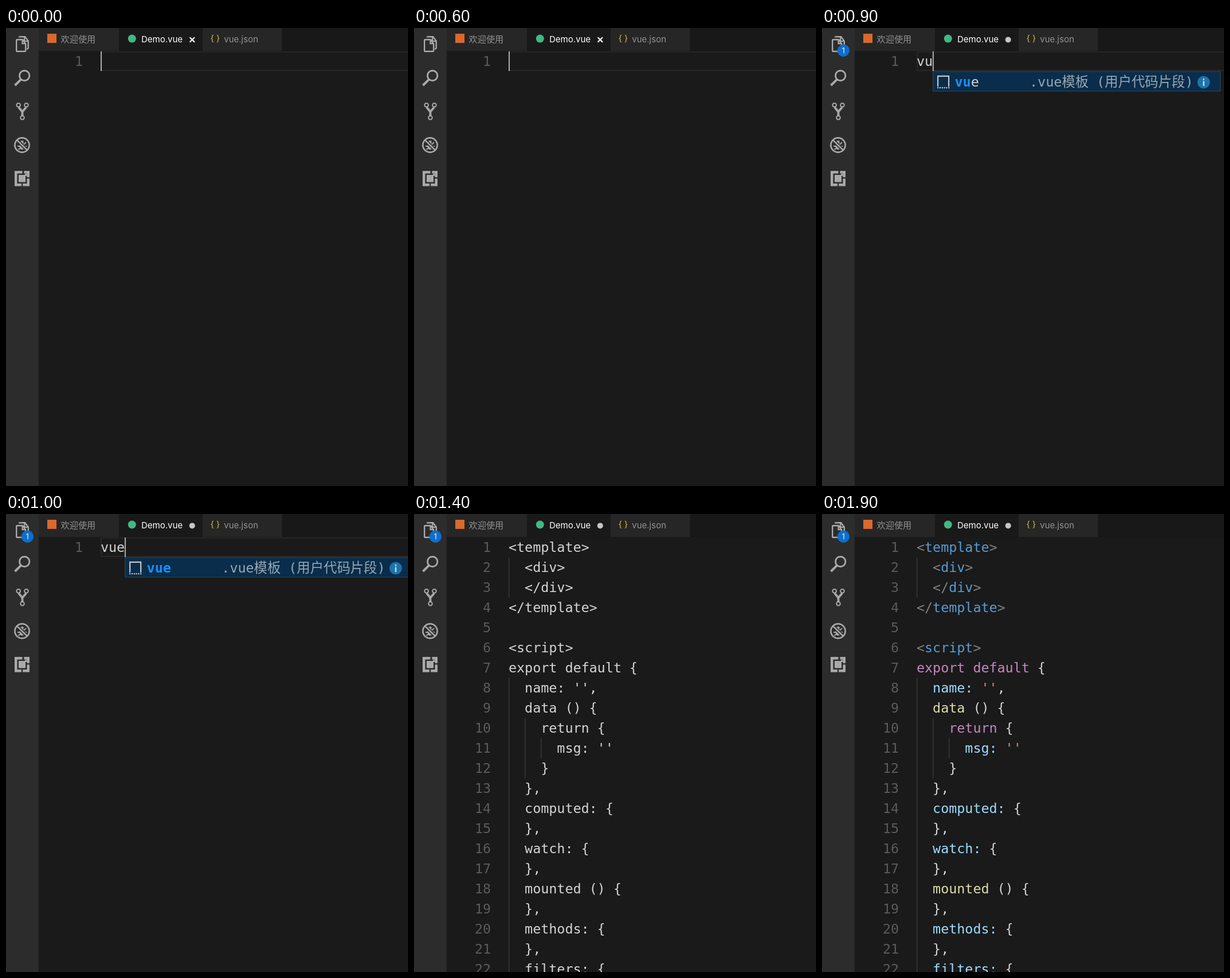
Animation, 701 px wide and 798 px high, one loop 3900 ms. Source, as an HTML page with a canvas:

```html
<!DOCTYPE html>
<html lang="zh-CN">
<head>
<meta charset="utf-8">
<title>Snippet demo</title>
<style>
html, body { margin: 0; width: 100%; height: 100%; overflow: hidden; background: #1a1a1a; }
canvas { display: block; width: 701px; height: 798px; }
</style>
</head>
<body>
<canvas id="stage" width="701" height="798"></canvas>
<script>
const ctx = document.getElementById('stage').getContext('2d', { alpha: false });
const LOOP = 3900, LEFT = 165, LINE = 35;
const CJK = "'Noto Sans CJK SC', 'Noto Sans CJK'";
const MONO = `23.35px 'DejaVu Sans Mono', ${CJK}, monospace`;
const UI = `15px Inter, ${CJK}, sans-serif`;
const BG = '#1a1a1a', SIDE = '#2c2c2c', ICON = '#a9a9a9', TEXT = '#d4d4d4';

const code = `<template>
  <div>
  </div>
</template>

<script>
export default {
  name: '',
  data () {
    return {
      msg: ''
    }
  },
  computed: {
  },
  watch: {
  },
  mounted () {
  },
  methods: {
  },
  filters: {`.split('\n');

// Indent guides: x, first line, last line
const guides = [[165, 2, 3], [165, 8, 22], [193, 10, 12], [221, 11, 11]];

function rect(x, y, w, h, color) {
  ctx.fillStyle = color;
  ctx.fillRect(x, y, w, h);
}

function disc(x, y, r, color) {
  ctx.fillStyle = color;
  ctx.beginPath();
  ctx.arc(x, y, r, 0, Math.PI * 2);
  ctx.fill();
}

function ring(x, y, r, width, color = ICON) {
  ctx.strokeStyle = color;
  ctx.lineWidth = width;
  ctx.beginPath();
  ctx.arc(x, y, r, 0, Math.PI * 2);
  ctx.stroke();
}

function line(path, width, color = ICON) {
  ctx.strokeStyle = color;
  ctx.lineWidth = width;
  ctx.stroke(new Path2D(path));
}

function text(str, x, y, font, color, align = 'left') {
  ctx.font = font;
  ctx.fillStyle = color;
  ctx.textAlign = align;
  ctx.fillText(str, x, y);
}

function charWidth() {
  ctx.font = MONO;
  return ctx.measureText('0').width;
}

function drawFiles() {
  line('M23 16.5 Q23 15.3 24.5 15.3 H33.2 L38.8 22.8 V35 Q38.8 36.2 36 36.4', 2.4);
  line('M32.2 15.5 V23 H38.8', 2.2);
  line('M19.8 20.2 H29 L34.2 27.6 V39.2 Q34.2 40.8 32.6 40.8 H19.8 Q18.2 40.8 18.2 39.2 V21.8 Q18.2 20.2 19.8 20.2 Z', 2.4);
  line('M28.6 20.2 V27.2 H34.2', 2.2);
}

function drawBug() {
  ctx.fillStyle = ICON;
  ctx.beginPath();
  ctx.ellipse(28, 206, 4.6, 6, 0, 0, Math.PI * 2);
  ctx.fill();
  disc(28, 198.5, 2.6, ICON);
  line('M20 206 H36 M21 199 L25 203 M35 199 L31 203 M21.5 212 L25 209 M34.5 212 L31 209', 1.8);
  line('M18 194 L38 214', 6, SIDE);
  line('M18.6 194.6 L37.4 213.4', 2.6);
  ring(28, 204, 12.6, 2.7);
}

function drawSidebar(badge) {
  rect(0, 0, 57, 798, SIDE);
  drawFiles();

  ring(32.2, 83, 8.7, 2.9);
  line('M25.8 89.8 L15.6 100', 4);

  line('M22 138 L28.5 146 L35.2 138 M28.5 145 V153', 3.8);
  for (const [x, y] of [[21.7, 134.3], [35.5, 134.3], [28.5, 156.3]]) ring(x, y, 3.3, 2);

  drawBug();

  rect(15, 249, 26, 26.5, ICON);
  rect(19.5, 253.5, 17, 17.5, SIDE);
  rect(22, 256, 12, 12.5, ICON);
  rect(27, 271, 2.2, 5, SIDE);
  rect(28.5, 248, 3, 6, SIDE);
  rect(36, 260, 6, 2.4, SIDE);
  rect(33, 254, 3.5, 4, ICON);

  if (badge) {
    disc(37.4, 39.3, 10.6, '#0c6fce');
    text('1', 37.4, 43.8, '12.5px Inter, sans-serif', '#fff', 'center');
  }
}

function drawTabs(dirty) {
  rect(57, 0, 644, 40.5, '#181818');
  rect(57, 0, 140, 40, '#262626');
  rect(343, 0, 138, 40, '#262626');
  rect(197, 0, 146, 41, '#191919');

  rect(72, 10, 16, 16, '#d9692d');
  text('欢迎使用', 95.5, 25, `15.2px ${CJK}, sans-serif`, '#929292');

  disc(219.7, 18.5, 7, '#41b883');
  text('Demo.vue', 236, 25, UI, '#fff');
  if (dirty) disc(324.6, 20.4, 5, '#c6c6c6');
  else line('M320.5 16.2 L328.9 24.6 M328.9 16.2 L320.5 24.6', 2.3, '#f0f0f0');

  text('{ }', 364.7, 23, '14.5px Inter, sans-serif', '#d4c12f', 'center');
  text('vue.json', 380, 25, UI, '#929292');
}

function drawNumber(n) {
  text(n, 134, 66 + (n - 1) * LINE, MONO, '#5a5a5a', 'right');
}

function drawSuggest(typed, cw) {
  const x = 179 + (typed - 1) * cw;
  rect(x, 75.5, 502, 35, '#34495a');
  rect(x + 1, 76.5, 500, 33, '#092d4b');

  line(`M${x + 9} 102 V83.8 H${x + 28} V102`, 2.2, '#c8c5c2');
  for (let i = 0; i < 6; i++) rect(x + 8 + i * 3.8, 103, 2.2, 2.2, '#c8c5c2');

  const word = 'vue', tx = x + 38.5;
  text(word.slice(0, typed), tx, 102, 'bold ' + MONO, '#188fff');
  text(word.slice(typed), tx + typed * cw, 102, MONO, TEXT);
  text('.vue模板 (用户代码片段)', x + 169, 102, MONO, '#98a7b2');

  disc(x + 472.4, 94.5, 10.8, '#1b74ad');
  rect(x + 471.2, 88, 2.6, 2.7, '#c3d7e4');
  rect(x + 471.2, 92.5, 2.6, 8.5, '#c3d7e4');
}

function drawInput(typed, cursor) {
  const cw = charWidth();
  ctx.strokeStyle = '#282828';
  ctx.lineWidth = 2;
  ctx.strokeRect(166, 41.5, 560, 32.5);
  drawNumber(1);
  text('vue'.slice(0, typed), LEFT, 66, MONO, TEXT);
  if (cursor) rect(LEFT + typed * cw - (typed ? 0.3 : 0), 40.5, 2, 34.5, '#aeafad');
  if (typed) drawSuggest(typed, cw);
}

function tokenColor(token, isTag) {
  if (isTag) return /\w/.test(token) ? '#569cd6' : '#808080';
  if (/^(export|default|return)$/.test(token)) return '#c586c0';
  if (/^(data|mounted)$/.test(token)) return '#dcdcaa';
  if (/^\w+:$/.test(token)) return '#9cdcfe';
  return token === "''" ? '#ce9178' : TEXT;
}

function drawCode(colored) {
  const cw = charWidth();
  for (const [x, from, to] of guides) {
    rect(x, 40.5 + (from - 1) * LINE, 1.3, (to - from + 1) * LINE, '#3c3c3c');
  }
  code.forEach((row, i) => {
    drawNumber(i + 1);
    const isTag = row.trim().startsWith('<');
    for (const m of row.matchAll(/\w+:?|''|[^\w\s']+/g)) {
      const color = colored ? tokenColor(m[0], isTag) : TEXT;
      text(m[0], LEFT + m.index * cw, 66 + i * LINE, MONO, color);
    }
  });
}

function draw(t) {
  rect(0, 0, 701, 798, BG);
  if (t < 1400) {
    const typed = t < 800 ? 0 : Math.min(3, Math.floor((t - 700) / 100));
    const hidden = (t >= 300 && t < 600) || t >= 1300;
    drawInput(typed, !hidden);
  } else {
    drawCode(t >= 1700);
  }
  drawTabs(t >= 800);
  drawSidebar(t >= 900);
}

const start = performance.now();
function tick() {
  draw((performance.now() - start) % LOOP);
  requestAnimationFrame(tick);
}
tick();
</script>
</body>
</html>
```
